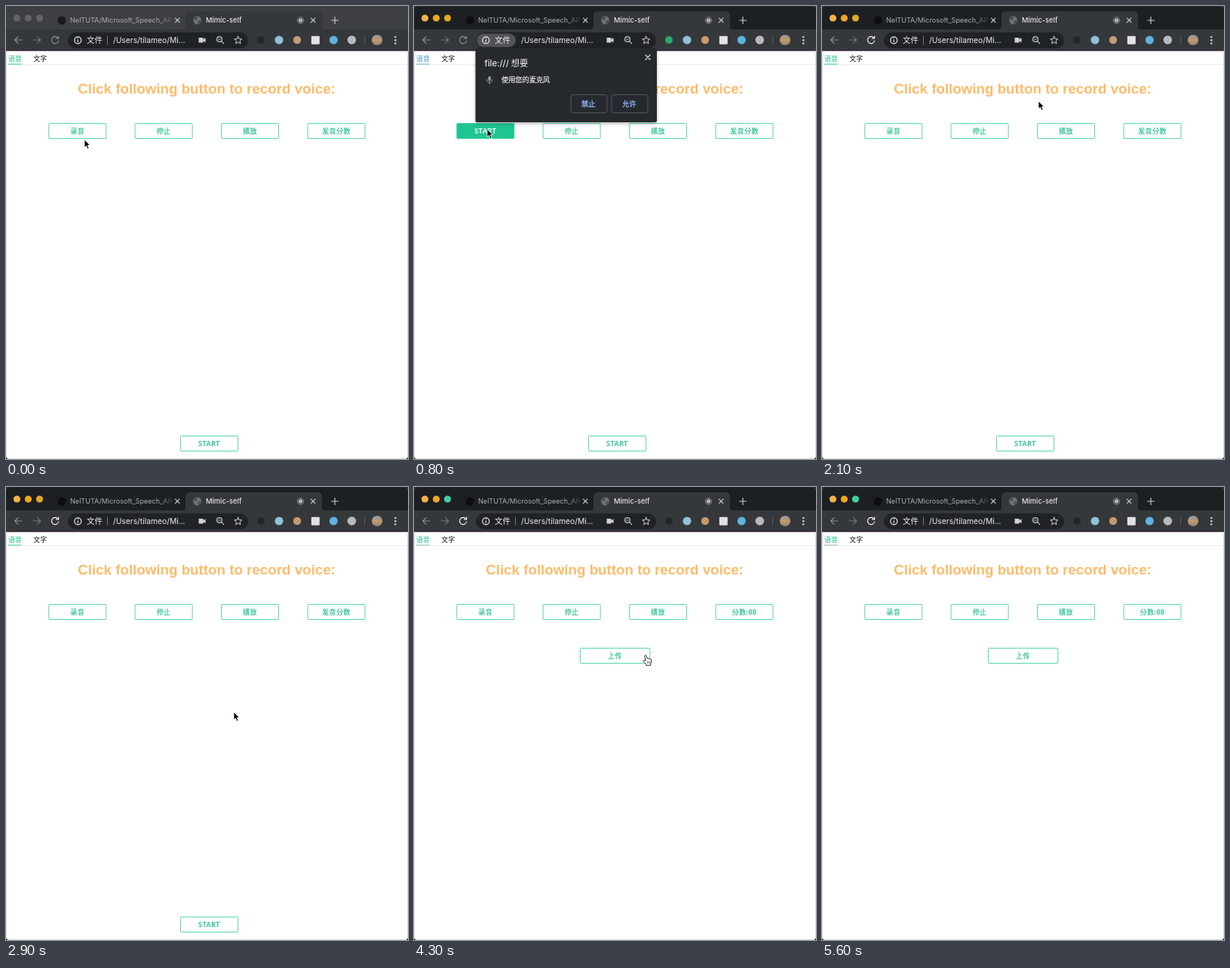
Animation, 533 px wide and 600 px high, one loop 5.7 s. Source, as an HTML page:

```html
<!DOCTYPE html>
<html lang="zh">
<head>
<meta charset="utf-8">
<title>Voice recorder</title>
<style>
html, body { margin: 0; width: 100%; height: 100%; overflow: hidden; background: #000; }
svg { display: block; width: 100%; height: 100%; }
text { font-family: Inter, "Noto Sans CJK SC", "Noto Sans CJK", sans-serif; }
.mid { text-anchor: middle; }
.line { fill: none; stroke-linecap: round; stroke-linejoin: round; }
.label { font: 500 9px Lato, "Noto Sans CJK SC", "Noto Sans CJK", sans-serif; letter-spacing: .45px; text-anchor: middle; fill: #22bd8d; stroke: #22bd8d; stroke-width: .2px; }
.alt { font-weight: 700; fill: #fff; stroke: none; }
</style>
</head>
<body>
<svg id="stage" viewBox="0 0 533 600">
  <defs>
    <clipPath id="window"><rect width="533" height="600" rx="4"/></clipPath>
    <linearGradient id="fade" gradientUnits="userSpaceOnUse" x1="203" x2="218" y1="0" y2="0">
      <stop offset="0" stop-color="#a9acb0"/><stop offset="1" stop-color="#a9acb0" stop-opacity=".2"/>
    </linearGradient>
    <linearGradient id="avatar" x2="0" y2="1">
      <stop offset="0" stop-color="#8795a0"/><stop offset=".5" stop-color="#c39b6c"/><stop offset="1" stop-color="#8f8478"/>
    </linearGradient>
    <filter id="shadow" x="-10%" y="-10%" width="120%" height="130%">
      <feDropShadow dx="0" dy="2" stdDeviation="2.2" flood-opacity=".28"/>
    </filter>
  </defs>

  <g clip-path="url(#window)">
    <rect width="533" height="600" fill="#fff"/>

    <!-- tab strip -->
    <rect id="strip" width="533" height="32"/>
    <g id="lights"><circle cx="14.5" cy="16" r="4.6"/><circle cx="29.5" cy="16" r="4.6"/><circle cx="44.5" cy="16" r="4.6"/></g>
    <circle id="repo" cx="74" cy="19" r="5.5"/>
    <text x="85" y="22.4" font-size="9.1" fill="url(#fade)">NelTUTA/Microsoft_Speech_AP</text>
    <path d="M232 32 Q238 32 238 26 V13 Q238 7 244 7 H413 Q419 7 419 13 V26 Q419 32 425 32Z" fill="#35383b"/>
    <circle cx="253.5" cy="19" r="5.4" fill="#6f7377"/>
    <path d="M249 16 q3 -3 5 -1 q0 3 -2 3 l-1 2z M254 20 q4 -2 4 0 q-1 4 -3 4z" fill="#4c5054"/>
    <text x="265" y="22.4" font-size="9.3" font-weight="500" fill="#e4e5e6">Mimic-self</text>
    <circle cx="390.5" cy="19" r="4.2" fill="none" stroke="#a3a5a7" stroke-width=".8"/>
    <circle cx="390.5" cy="19" r="2.7" fill="#b3b5b7"/>
    <g class="line" stroke="#c9cbcd" stroke-width="1.2">
      <path d="M224.5 16.2 l5.4 5.4 m0 -5.4 l-5.4 5.4 M404.5 16.2 l5.4 5.4 m0 -5.4 l-5.4 5.4 M431.5 19 h9 m-4.5 -4.5 v9"/>
    </g>

    <!-- toolbar -->
    <rect y="31" width="533" height="28" fill="#35383b"/>
    <rect x="82" y="35" width="239" height="21" rx="10.5" fill="#202326"/>
    <rect id="chip" x="83" y="36.5" width="52" height="18" rx="9" fill="#505357"/>
    <g class="line" stroke-width="1.2">
      <path d="M21 45 H11.8 m4.3 -4.4 l-4.4 4.4 l4.4 4.4" stroke="#8f9295"/>
      <path d="M36.5 45 h9.2 m-4.3 -4.4 l4.4 4.4 l-4.4 4.4" stroke="#737679"/>
      <path id="reload" d="M68.7 42.2 A4.6 4.6 0 1 0 69.6 46 M69.6 40 v3 h-3.2"/>
      <circle cx="95.3" cy="45.3" r="4.5" stroke="#f0f1f1"/>
      <path d="M95.3 45 v2.6 M95.3 42.8 v.1" stroke="#f0f1f1"/>
      <path id="divider" d="M134.5 40 v11" stroke="#74777a" stroke-width="1"/>
      <circle cx="283" cy="44" r="3.4" stroke="#c9cbcd"/>
      <path d="M285.6 46.6 l3 3 M281.8 44 h2.4" stroke="#c9cbcd"/>
      <path id="star" stroke="#d3d5d6" stroke-width="1"/>
    </g>
    <text x="107" y="49" font-size="10.4" font-weight="500" fill="#f2f2f2">文件</text>
    <text x="142" y="49" font-size="10.3" fill="#eceded">/Users/tilameo/Mi...</text>
    <path d="M255.5 42 h6 v2.2 l3 -2 v6 l-3 -2 v2.3 h-6z" fill="#d0d2d4"/>
    <circle id="ext" cx="338" cy="45" r="5"/>
    <circle cx="362" cy="45" r="5.6" fill="#8fc0d6"/>
    <circle cx="386" cy="45" r="5.2" fill="#c49a6c"/>
    <rect x="404.8" y="39.8" width="11" height="11" rx="1" fill="#dfe1e2"/>
    <circle cx="434.3" cy="45" r="5.5" fill="#5cb3df"/>
    <circle cx="458.4" cy="45" r="5.8" fill="#b7b9bb"/>
    <path d="M475.5 39 v12" stroke="#595c5f"/>
    <circle cx="492" cy="45" r="7" fill="url(#avatar)"/>
    <g fill="#d9dadb"><circle cx="516.3" cy="41" r="1.2"/><circle cx="516.3" cy="45.2" r="1.2"/><circle cx="516.3" cy="49.4" r="1.2"/></g>

    <!-- page -->
    <path d="M0 77.5 H533" stroke="#ececec"/>
    <text id="voice" x="3" y="73.3" font-size="9">语音</text>
    <text x="36.2" y="73.3" font-size="9" fill="#111">文字</text>
    <path id="under" d="M3 77 H20.5"/>
    <text x="266" y="116" class="mid" style="font:700 18.76px 'Liberation Sans', Arial, sans-serif" fill="#fcbc6b">Click following button to record voice:</text>
    <g id="buttons"></g>

    <rect x=".5" y="59.5" width="532" height="540" rx="3.5" fill="none" stroke="#dcdcdc"/>
    <rect y="58.3" width="533" height="1.2" fill="#2c1730"/>

    <!-- permission prompt -->
    <g id="prompt">
      <rect x="81.5" y="56" width="240.5" height="98" rx="2.5" fill="#272a2d" filter="url(#shadow)"/>
      <text x="93.5" y="80" font-size="11.2" font-weight="500" fill="#ececed">file:/// 想要</text>
      <path d="M307 65 l6 6 m0 -6 l-6 6" class="line" stroke="#e3e4e5" stroke-width="1.3"/>
      <rect x="98.4" y="93" width="3.4" height="6.4" rx="1.7" fill="#9a9da0"/>
      <path d="M96.4 97.5 a3.7 3.7 0 0 0 7.4 0 M100.1 101.4 v2" class="line" stroke="#9a9da0"/>
      <text x="116" y="101.2" font-size="9.2" fill="#ececed" stroke="#ececed" stroke-width=".2">使用您的麦克风</text>
      <g fill="none" stroke="#54585c">
        <rect x="208" y="117.5" width="48" height="24" rx="3"/><rect x="262" y="117.5" width="48" height="24" rx="3"/>
      </g>
      <g class="mid" font-size="9.3" fill="#8ab4f8" stroke="#8ab4f8" stroke-width=".35">
        <text x="231.2" y="132.8">禁止</text><text x="285.2" y="132.8">允许</text>
      </g>
    </g>

    <g id="cursor" stroke-linejoin="round">
      <path id="arrow" d="M0 0 V10.3 L2.4 8.2 L4.1 12.2 L6 11.4 L4.3 7.5 H7.5Z" fill="#000" stroke="#fff" stroke-width=".8"/>
      <g id="hand" transform="translate(.8 0) scale(1.05)" stroke="#222" stroke-width=".9">
        <path d="M-1 .5 Q0 -1 1.2 .5 L2.2 4 Q3.2 3 4 4.2 Q5.2 3.3 5.8 4.8 Q7.5 4.4 7.6 6.2 Q7.8 9 6.6 10.6 V12.6 H1 V11.4 Q-1 9.4 -2.4 7 Q-2.4 5.6 -.6 6.2 L.4 7Z" fill="#fff"/>
        <path d="M2.6 7.5 v2.6 M4.2 7.5 v2.6 M5.8 7.5 v2.6" stroke-width=".6"/>
      </g>
    </g>
  </g>
</svg>
<script>
const LOOP = 5700, STEP = 100, HOVER = 100;
const ACTIVE = 300, ASK = 700, ALLOW = 1300, SCORED = 4100, LEAVE = 5500;
const GREEN = '#2fcb9b';
const $ = id => document.getElementById(id);
const clamp = v => Math.max(0, Math.min(1, v));
const show = (node, on) => node.setAttribute('visibility', on ? 'inherit' : 'hidden');
const paint = (id, color, attr = 'fill') => $(id).setAttribute(attr, color);

function add(parent, tag, attrs, content) {
  const node = document.createElementNS('http://www.w3.org/2000/svg', tag);
  for (const key in attrs) node.setAttribute(key, attrs[key]);
  if (content) node.textContent = content;
  return parent.appendChild(node);
}

function makeButton(x, y, w, label, alt, from = Infinity, to = Infinity) {
  const h = 20, id = `clip${x}`, cx = x + w / 2, base = y + 13.2;
  const node = add($('buttons'), 'g', {});
  const box = { x, y, width: w, height: h, rx: 1 };
  add(add(node, 'clipPath', { id }), 'rect', box);
  const fill = add(node, 'rect', { ...box, fill: '#1ec592' });
  add(node, 'rect', { ...box, fill: 'none', stroke: GREEN, 'stroke-opacity': .8 });
  const inner = add(node, 'g', { 'clip-path': `url(#${id})` });
  const text = add(inner, 'text', { x: cx, class: 'label' }, label);
  const over = add(inner, 'text', { x: cx, class: 'label alt' }, alt);
  return {
    node, text,
    hit: (px, py) => px >= x && px <= x + w && py >= y && py <= y + h,
    update(t) {
      const p = clamp((t - from) / HOVER) - clamp((t - to) / HOVER);
      fill.setAttribute('opacity', p ** 3);
      text.setAttribute('y', base - p * h);
      over.setAttribute('y', base + (1 - p) * h);
      show(over, p > 0);
    }
  };
}

const score = makeButton(400, 155.5, 76, '发音分数', 'SCORE', 3800, 4100);
const upload = makeButton(220.3, 213.5, 92.5, '上传', 'UPLOAD', 4300, 4600);
const start = makeButton(231.5, 569.5, 76, 'START', '');
const buttons = [
  makeButton(56.8, 155.5, 76, '录音', 'START', 200, 1100),
  makeButton(171.1, 155.5, 76, '停止', 'STOP', 3650, 3850),
  makeButton(285.5, 155.5, 76, '播放', 'PLAY'),
  score, upload, start
];

// the pointer rests, then darts; it dips below the window while recording
const path = [
  [0, 104, 177], [200, 97, 163], [1000, 97, 163], [1200, 287, 126], [2700, 287, 126],
  [2900, 302, 298], [3100, 306, 604], [3500, 306, 604], [3700, 209.5, 167], [3800, 209.5, 167],
  [3900, 436, 166], [4200, 436, 166], [4300, 306, 223], [4400, 280, 224], [4600, 280, 224],
  [4800, 290, 272], [4900, 290, 272], [5100, 298, 343], [LOOP, 298, 343]
];

function pointer(t) {
  const i = path.findIndex(k => k[0] > t);
  const [t0, x0, y0] = path[i - 1], [t1, x1, y1] = path[i];
  const p = (t - t0) / (t1 - t0), e = p * p * (3 - 2 * p);
  return [x0 + (x1 - x0) * e, y0 + (y1 - y0) * e];
}

let star = '';
for (let i = 0; i < 10; i++) {
  const a = Math.PI * (i / 5 - .5), r = i % 2 ? 2.4 : 5.3;
  star += `${i ? 'L' : 'M'}${307.8 + r * Math.cos(a)} ${45.5 + r * Math.sin(a)}`;
}
$('star').setAttribute('d', star + 'Z');

function render(t) {
  const active = t >= ACTIVE, asking = t >= ASK && t < ALLOW, scored = t >= SCORED;
  paint('strip', active ? '#1d2022' : '#3d3f43');
  paint('repo', active ? '#0c0e0f' : '#17191b');
  const colors = active ? ['#f5b04a', '#f0a624', scored ? '#43cfa0' : '#dda928'] : Array(3).fill('#626467');
  [...$('lights').children].forEach((c, i) => c.setAttribute('fill', colors[i]));
  paint('reload', t < ALLOW ? '#8f9295' : '#f0f1f1', 'stroke');
  paint('ext', asking ? '#2aa873' : '#232629');
  paint('voice', asking ? '#4b94cf' : '#22bd8d');
  paint('under', asking ? '#6fa9cf' : scored ? '#86bda8' : GREEN, 'stroke');
  show($('chip'), asking);
  show($('divider'), !asking);
  show($('prompt'), asking);

  score.text.textContent = scored ? '分数:88' : '发音分数';
  show(start.node, !scored);
  show(upload.node, scored);
  buttons.forEach(b => b.update(t));

  const [x, y] = pointer(t);
  const hand = !asking && buttons.some(b => b.hit(x, y));
  $('cursor').setAttribute('transform', `translate(${x} ${y})`);
  show($('cursor'), t < LEAVE);
  show($('arrow'), !hand);
  show($('hand'), hand);
}

const begin = performance.now();
function tick() {
  const t = (performance.now() - begin) % LOOP;
  render(Math.floor(t / STEP) * STEP);
  requestAnimationFrame(tick);
}
tick();
</script>
</body>
</html>
```
